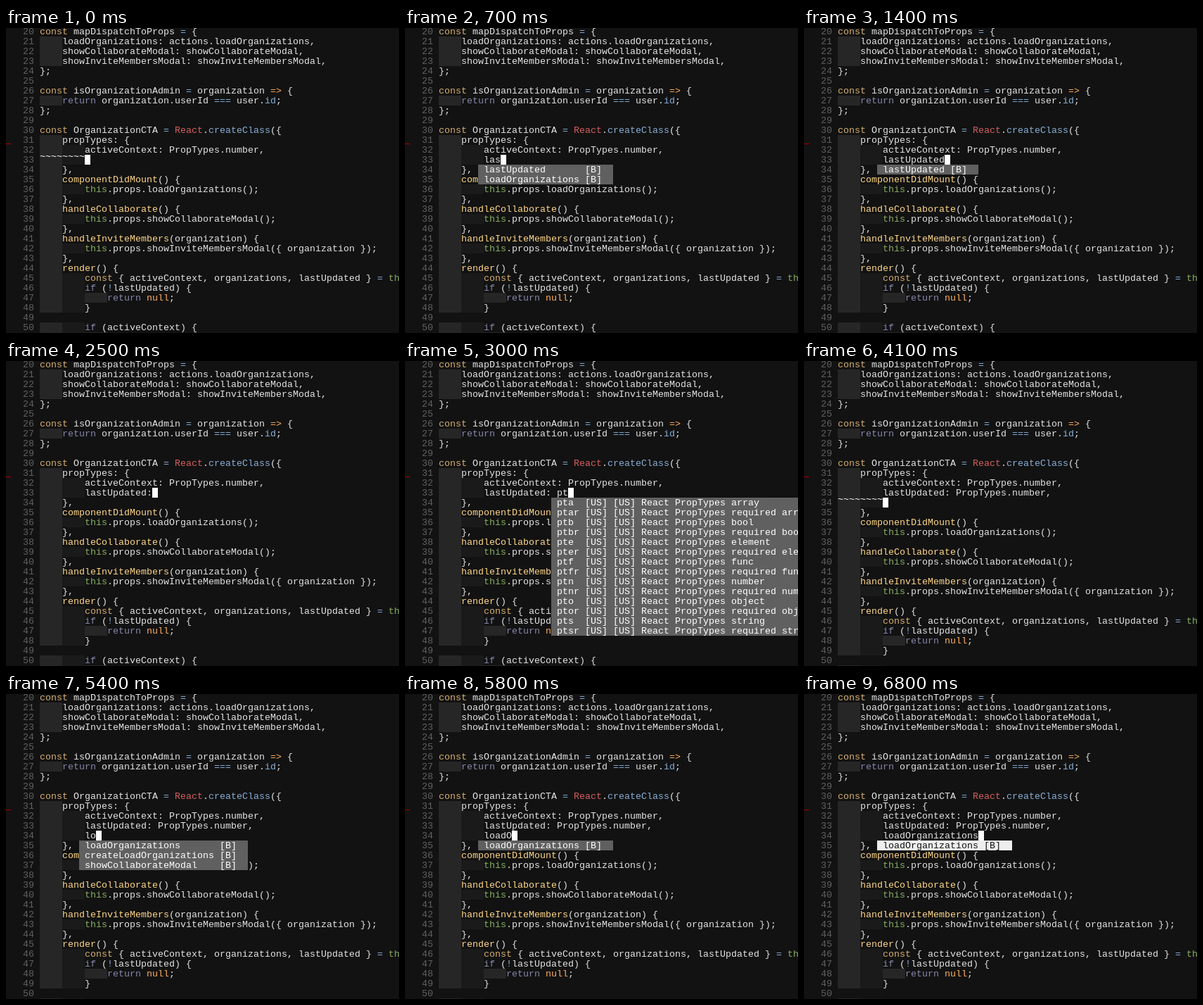
Write an HTML page with a canvas that moves like this. It is 559 px wide and 433 px high and loops after 8 s.

```html
<!DOCTYPE html>
<html lang="en">
<head>
<meta charset="utf-8">
<title>Completion in a code editor</title>
<style>
html, body { margin: 0; width: 100%; height: 100%; overflow: hidden; background: #121212; }
canvas { display: block; }
</style>
</head>
<body>
<canvas id="stage" width="559" height="433"></canvas>
<script>
const ctx = document.getElementById('stage').getContext('2d');
const LOOP = 8000, CELL = 8, ROW = 14, TOP = -2, BASE = 11, LEFT = 48, FIRST = 20;
const INDENT = 8;
const FG = '#e4e4e4', GREY = '#606060';
const GUIDES = ['#262626', '#1a1a1a'];

const before = `const mapDispatchToProps = {
    loadOrganizations: actions.loadOrganizations,
    showCollaborateModal: showCollaborateModal,
    showInviteMembersModal: showInviteMembersModal,
};

const isOrganizationAdmin = organization => {
    return organization.userId === user.id;
};

const OrganizationCTA = React.createClass({
    propTypes: {
        activeContext: PropTypes.number,`.split('\n');

const after = `    },
    componentDidMount() {
        this.props.loadOrganizations();
    },
    handleCollaborate() {
        this.props.showCollaborateModal();
    },
    handleInviteMembers(organization) {
        this.props.showInviteMembersModal({ organization });
    },
    render() {
        const { activeContext, organizations, lastUpdated } = this.props;
        if (!lastUpdated) {
            return null;
        }

        if (activeContext) {
            return null;`.split('\n');

// Syntax colours, first match wins
const rules = [
  [/^const\b/, '#d7af6f'],
  [/^(return|if)\b/, '#8787af'],
  [/^(=>|null\b)/, '#ffaf5f'],
  [/^React\b/, '#d75f5f'],
  [/^this\b/, '#87af5f'],
  [/^(componentDidMount|handleCollaborate|handleInviteMembers|render)(?=\()/, '#ffd787'],
  [/^(=+|!|(createClass|id)\b)/, '#87afd7'],
  [/^(\w+|\s+|[^\w\s=!]+)/, FG]
];

function tokenize(line) {
  const out = [];
  for (let i = 0; i < line.length;) {
    const rest = line.slice(i);
    const [re, color] = rules.find(r => r[0].test(rest));
    const text = rest.match(re)[0];
    out.push({ text, color, col: i });
    i += text.length;
  }
  return out;
}

// Popup menus: every row is as wide as the longest one
function menu(col, rows) {
  const width = Math.max(...rows.map(r => r.length));
  return { col, rows: rows.map(r => r.padEnd(width)) };
}
function words(...list) {
  const width = Math.max(...list.map(w => w.length));
  return menu(INDENT - 1, list.map(w => ` ${w.padEnd(width)} [B]  `));
}
const snippet = (key, label) => ` ${key.padEnd(4)} [US] [US] React PropTypes ${label} `;
const pair = name => [snippet('pt' + name[0], name), snippet(`pt${name[0]}r`, 'required ' + name)];
const snippets = names => menu(20, names.flatMap(pair));

const two = words('lastUpdated', 'loadOrganizations');
const last = words('lastUpdated');
const many = snippets(['array', 'bool', 'element', 'func', 'number', 'object', 'string']);
const number = snippets(['number']);
const three = words('loadOrganizations', 'createLoadOrganizations', 'showCollaborateModal');
const load = words('loadOrganizations');
const chosen = { ...load, selected: true };

// [start in ms, text being typed, popup]
const steps = [
  [0, ''],
  [500, 'l'],
  [600, 'la', two],
  [700, 'las', two],
  [900, 'last', last],
  [1000, 'lastUp', last],
  [1100, 'lastUpda', last],
  [1200, 'lastUpdate', last],
  [1400, 'lastUpdated', last],
  [2500, 'lastUpdated:'],
  [2600, 'lastUpdated: '],
  [2800, 'lastUpdated: p'],
  [2900, 'lastUpdated: pt'],
  [3000, 'lastUpdated: pt', many],
  [3200, 'lastUpdated: ptn', number],
  [3300, 'lastUpdated: ptn'],
  [3400, 'lastUpdated: PropTypes.number'],
  [3900, 'lastUpdated: PropTypes.number,'],
  [4000, ''],
  [5300, 'l'],
  [5400, 'lo', three],
  [5500, 'loa', three],
  [5600, 'load', three],
  [5800, 'loadO', load],
  [5900, 'loadOr'],
  [6000, 'loadOr', load],
  [6300, 'loadOrg', load],
  [6800, 'loadOrganizations', chosen]
];
const NEWLINE = 4000;
const pad = ' '.repeat(INDENT);
const doneLine = pad + 'lastUpdated: PropTypes.number,';

const rowY = row => TOP + row * ROW;
const colX = col => LEFT + col * CELL;

function block(col, row, cells, color) {
  ctx.fillStyle = color;
  ctx.fillRect(colX(col), rowY(row), cells * CELL, ROW);
}

function write(text, col, row, color, lift = 0) {
  ctx.fillStyle = color;
  ctx.fillText(text, colX(col), rowY(row) + BASE - lift);
}

function drawLine(line, row) {
  const indent = line.match(/^ */)[0].length;
  for (let c = 0; c < indent; c += 4) block(c, row, 4, GUIDES[(c / 4) % 2]);
  for (const t of tokenize(line)) {
    if (t.text.trim()) write(t.text, t.col, row, t.color);
  }
}

function drawPopup(popup, row) {
  popup.rows.forEach((text, i) => {
    block(popup.col, row + i, text.length, popup.selected ? '#eeeeee' : GREY);
    write(text, popup.col, row + i, popup.selected ? '#101010' : '#ffffff');
  });
}

function draw(time) {
  const [start, typed, popup] = steps.filter(s => s[0] <= time).pop();
  const head = start >= NEWLINE ? [...before, doneLine] : before;
  const row = head.length;

  ctx.fillStyle = '#121212';
  ctx.fillRect(0, 0, 559, 433);
  ctx.font = '13.333px "Liberation Mono", monospace';
  ctx.textBaseline = 'alphabetic';

  [...head, pad + typed, ...after].slice(0, 32).forEach((line, i) => {
    drawLine(line, i);
    write(String(FIRST + i), -3, i, GREY);
  });

  // Error sign in the gutter
  ctx.fillStyle = '#af0000';
  ctx.fillRect(0, 164, 7, 1);

  if (!typed) write('~'.repeat(INDENT), 0, row, '#ffffff', 5);
  block(INDENT + typed.length, row, 1, '#ffffff');
  if (popup) drawPopup(popup, row + 1);
}

const origin = performance.now();
function tick() {
  draw((performance.now() - origin) % LOOP);
  requestAnimationFrame(tick);
}
tick();
</script>
</body>
</html>
```
